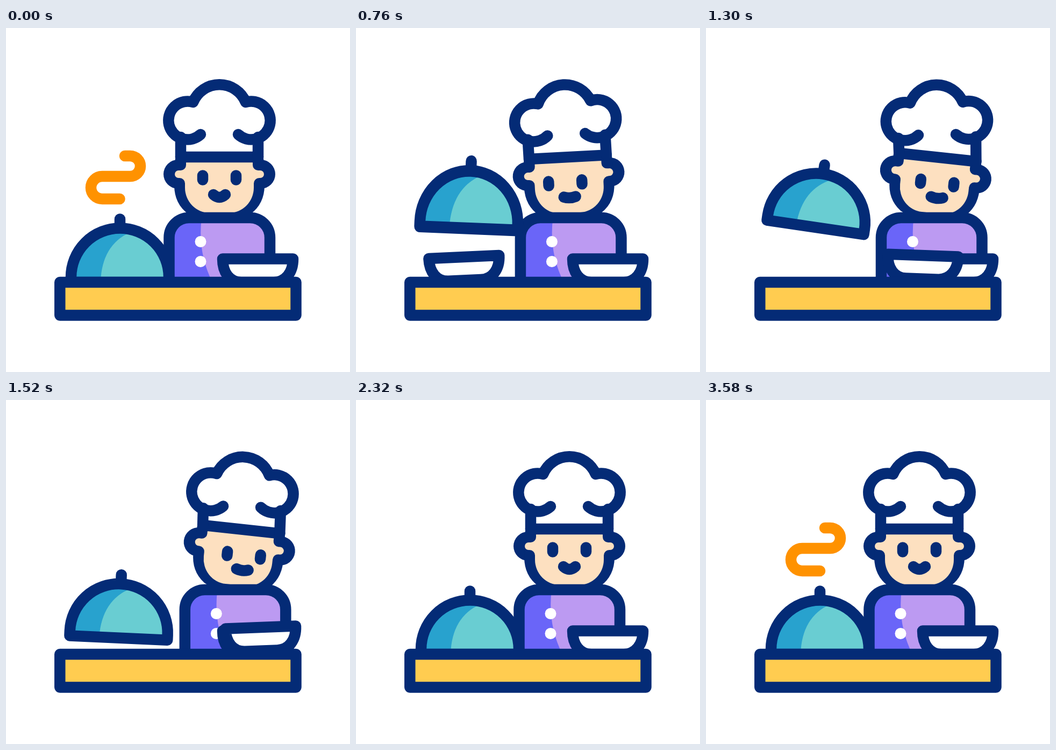
Write an HTML page with a canvas that moves like this. It is 640 px wide and 640 px high and loops after 3.6 s.

```html
<!DOCTYPE html>
<html lang="en">
<head>
<meta charset="utf-8">
<title>Chef serving a dish</title>
<style>
  html, body { margin: 0; width: 100%; height: 100%; overflow: hidden; background: #fff; }
  canvas { display: block; width: 640px; height: 640px; }
</style>
</head>
<body>
<canvas id="stage" width="640" height="640"></canvas>
<script>
const ctx = document.getElementById('stage').getContext('2d');
const LOOP = 3600;
const NAVY = '#042b76', YELLOW = '#ffcc50', TEAL = '#69cdd2', BLUE = '#28a2ce',
      VIOLET = '#6a65f8', LILAC = '#bc9af2', SKIN = '#fde0c0', ORANGE = '#ff9200';

const shapes = {
  puff: new Path2D('M362 198A35.5 35.5 0 1 1 348 138A53 53 0 0 1 446 138A35.5 35.5 0 1 1 432 198'),
  skull: new Path2D('M315 240H479L481 292Q481 327 455 346L440 354H354L339 346Q313 327 313 292Z'),
  face: new Path2D('M335 249V255A10 10 0 0 1 325 265H321A7 7 0 0 0 321 279H323A10 10 0 0 1 333 289V297' +
    'A46 47 0 0 0 379 344H415A46 47 0 0 0 461 297V289A10 10 0 0 1 471 279H473A7 7 0 0 0 473 265H469A10 10 0 0 1 459 255V249Z'),
  body: new Path2D('M303.5 475V390A37 37 0 0 1 340.5 353H454A37 37 0 0 1 491 390V475'),
  bodyLight: new Path2D('M364 353Q356 417 384 473H500V353Z'),
  lid: new Path2D('M121 473V463.5A91 91 0 0 1 303 463.5V473Z'),
  lidShade: new Path2D('M231 380Q178 404 176 473H110V370Z'),
  bowl: new Path2D('M403 429.5H534C534 455 520 473 498 473H438C416 473 403 455 403 429.5Z'),
  steam: new Path2D('M212 318H179A21 21 0 0 1 179 276H231A19 19 0 0 0 231 238H221')
};
const STEAM_LENGTH = 96 + 40 * Math.PI;

const radians = degrees => degrees * Math.PI / 180;
const progress = (t, from, to) => Math.min(1, Math.max(0, (t - from) / (to - from)));

// Each move is an eased ramp; a pose is the sum of the moves made so far.
function poseAt(t) {
  const ramp = (from, to) => (1 - Math.cos(Math.PI * progress(t, from, to))) / 2;
  const lookDown = ramp(200, 640) - ramp(1540, 2120);
  const lookRight = ramp(1080, 1440) - ramp(1540, 2120);
  return {
    bodyX: 2.5 * ramp(450, 800) + 27 * ramp(800, 1560) - 29.5 * ramp(1560, 2310),
    headTilt: -3 * ramp(150, 700) + 9.2 * ramp(760, 1330) - 6.2 * ramp(1500, 1870),
    hatTilt: -3.6 * ramp(200, 800) + 5.6 * ramp(1080, 1560) - 2 * ramp(1560, 1870),
    eyeX: 10 * lookRight - 7 * (ramp(200, 640) - ramp(1080, 1440)),
    eyeY: 9 * lookDown,
    mouthX: 10 * lookRight,
    mouthFlat: lookDown,
    lidY: -104 * (ramp(270, 770) - ramp(1260, 1670)),
    lidTilt: 10.6 * (ramp(600, 1120) - ramp(1120, 1720)),
    lidStretch: 1 + 0.065 * (ramp(300, 760) - ramp(760, 1080)),
    bowlX: -256 - 11 * ramp(400, 800) + 273 * ramp(860, 1530) - 6 * ramp(1530, 1650),
    bowlY: -6.4 * (ramp(400, 1080) - ramp(1520, 1650)),
    bowlTilt: -2.6 * ramp(400, 760) + 10.4 * ramp(760, 1080) - 10 * ramp(1080, 1480) + 2.2 * ramp(1520, 1650)
  };
}

function fill(path, color) {
  ctx.fillStyle = color;
  ctx.fill(path);
}

function stroke(path, color = NAVY) {
  ctx.strokeStyle = color;
  ctx.stroke(path);
}

function line(x0, y0, x1, y1) {
  const path = new Path2D();
  path.moveTo(x0, y0);
  path.lineTo(x1, y1);
  stroke(path);
}

function disc(x, y, r, color) {
  const path = new Path2D();
  path.arc(x, y, r, 0, 2 * Math.PI);
  fill(path, color);
}

function group(draw) {
  ctx.save();
  draw();
  ctx.restore();
}

function turn(x, y, degrees, stretch = 1) {
  ctx.translate(x, y);
  ctx.rotate(radians(degrees));
  ctx.scale(1, stretch);
  ctx.translate(-x, -y);
}

function shaded(base, baseColor, part, partColor) {
  fill(base, baseColor);
  group(() => {
    ctx.clip(base);
    fill(part, partColor);
  });
  stroke(base);
}

function drawFace(p) {
  for (const x of [366, 428]) {
    line(x + p.eyeX, 274.5 + p.eyeY, x + p.eyeX, 282.5 + p.eyeY);
  }
  const mouth = new Path2D(), end = 310 + 4 * p.mouthFlat;
  mouth.moveTo(386 + p.mouthX, end);
  mouth.quadraticCurveTo(397 + p.mouthX, 320 - 2 * p.mouthFlat, 408 + p.mouthX, end);
  stroke(mouth);
}

// The top of the hat leans on its own; its sides stay joined to the band.
function drawHat(lean) {
  turn(397, 240, lean);
  stroke(shapes.puff);
  for (const reach of [-72, 72]) {
    line(397 + reach, 203, 397 + reach * Math.cos(radians(lean)), 240 - reach * Math.sin(radians(lean)));
  }
}

function drawChef(p) {
  ctx.translate(p.bodyX, 0);
  group(() => {
    turn(397, 346, p.headTilt);
    disc(320, 272, 27, NAVY);
    disc(474, 272, 27, NAVY);
    fill(shapes.skull, NAVY);
    fill(shapes.face, SKIN);
    drawFace(p);
    line(325, 240, 469, 240);
    drawHat(p.hatTilt - p.headTilt);
  });
  shaded(shapes.body, VIOLET, shapes.bodyLight, LILAC);
  for (const y of [397.5, 434.5]) disc(362, y, 10.5, '#fff');
}

function drawBowl(x = 0, y = 0, tilt = 0) {
  group(() => {
    ctx.translate(x, y);
    turn(468, 451, tilt);
    fill(shapes.bowl, '#fff');
    stroke(shapes.bowl);
  });
}

function drawLid(p) {
  ctx.translate(0, p.lidY);
  turn(212, 414.5, p.lidTilt, p.lidStretch);
  line(212, 355.5, 212, 372);
  shaded(shapes.lid, TEAL, shapes.lidShade, BLUE);
}

// The line vanishes from its lower end first, and later grows back from there.
function drawSteam(t) {
  const growing = t > LOOP / 2;
  const from = growing ? 0 : STEAM_LENGTH * progress(t, 0, 480);
  const to = growing ? STEAM_LENGTH * progress(t, 2964, 3580) : STEAM_LENGTH;
  if (to <= from) return;
  ctx.setLineDash([to - from, 1000]);
  ctx.lineDashOffset = -from;
  stroke(shapes.steam, ORANGE);
}

function drawTable() {
  const top = new Path2D();
  top.rect(100.25, 473, 439.25, 61.5);
  fill(top, YELLOW);
  stroke(top);
}

function render(t) {
  const p = poseAt(t);
  ctx.fillStyle = '#fff';
  ctx.fillRect(0, 0, 640, 640);
  ctx.lineWidth = 20.5;
  ctx.lineCap = ctx.lineJoin = 'round';
  group(() => drawChef(p));
  drawBowl();
  if (t < 1650) drawBowl(p.bowlX, p.bowlY, p.bowlTilt);
  group(() => drawSteam(t));
  group(() => drawLid(p));
  drawTable();
}

const start = performance.now();
function tick() {
  render((performance.now() - start) % LOOP);
  requestAnimationFrame(tick);
}
tick();
</script>
</body>
</html>
```
